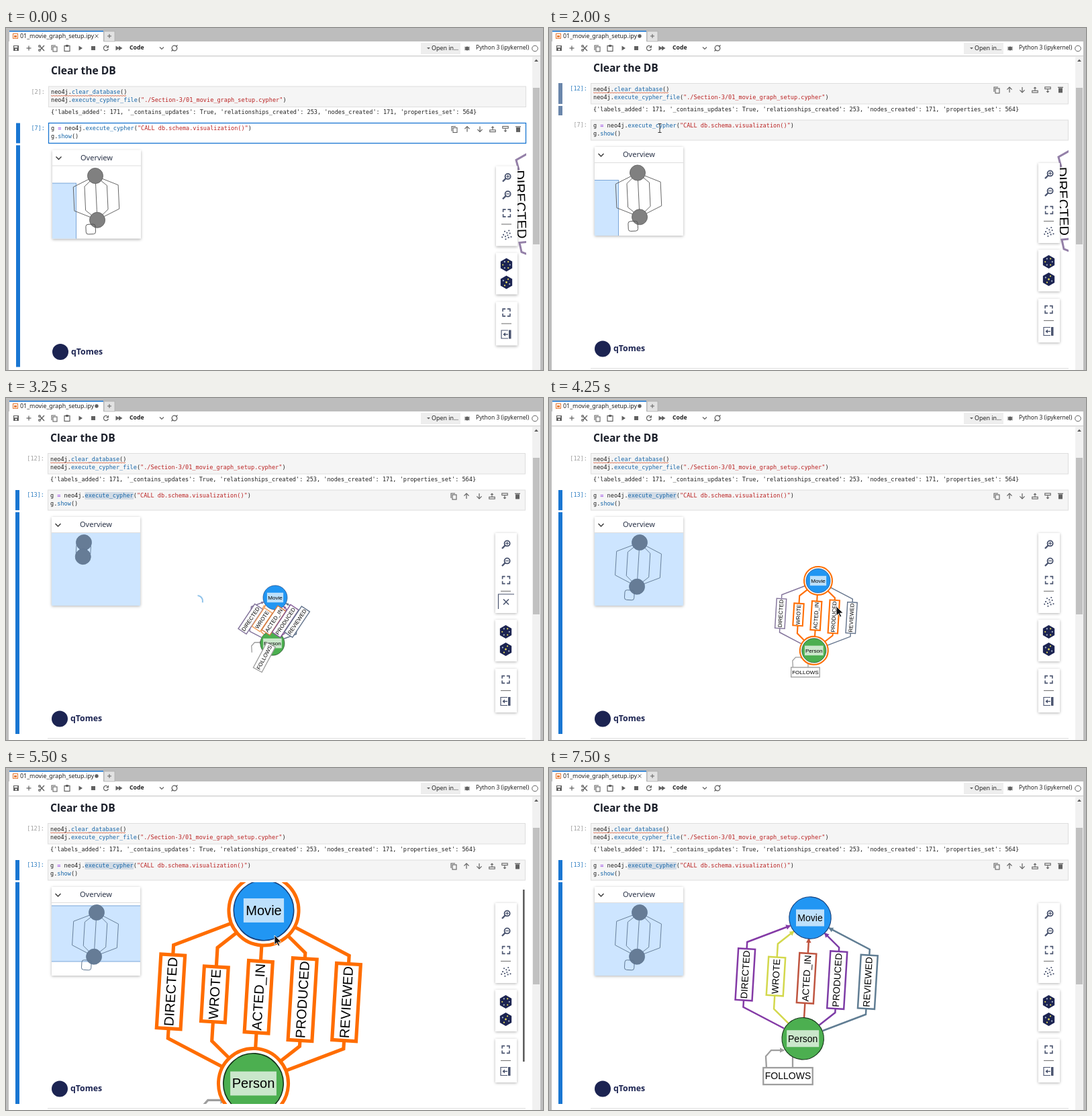
Animation, 800 px wide and 509 px high, one loop 7.75 s. Source, as an HTML page with a canvas:

```html
<!DOCTYPE html>
<html lang="en">
<head>
<meta charset="utf-8">
<title>Notebook graph</title>
<style>
  html, body { margin: 0; width: 100%; height: 100%; overflow: hidden; background: #fff; }
  canvas { display: block; width: 800px; height: 509px; }
</style>
</head>
<body>
<canvas id="stage" width="800" height="509"></canvas>
<script>
const ctx = document.getElementById('stage').getContext('2d');
const LOOP = 7750, STEP = 250, TAU = Math.PI * 2;
const MONO = '"DejaVu Sans Mono", monospace', UI = '"Noto Sans", sans-serif', ARIAL = '"Liberation Sans", sans-serif';
const BLUE = '#1976d2', ICON = '#616161', ORANGE = '#ff6d00', NAVY = '#1c2452', SLATE = '#4b5570';
const TILT = 0.06;

const clamp01 = v => Math.max(0, Math.min(1, v));
const mix = (a, b, u) => a + (b - a) * u;
const between = (k, a, b) => k >= a && k <= b;

function box(x, y, w, h, fill, stroke, lw = 1) {
  if (fill) { ctx.fillStyle = fill; ctx.fillRect(x, y, w, h); }
  if (stroke) { ctx.strokeStyle = stroke; ctx.lineWidth = lw; ctx.strokeRect(x, y, w, h); }
}
function path(pts, color, lw = 1, fill) {
  ctx.beginPath();
  pts.forEach(([x, y], i) => i ? ctx.lineTo(x, y) : ctx.moveTo(x, y));
  if (fill) { ctx.closePath(); ctx.fillStyle = fill; ctx.fill(); }
  if (color) { ctx.strokeStyle = color; ctx.lineWidth = lw; ctx.stroke(); }
}
function disc(x, y, r, fill, stroke, lw = 1) {
  ctx.beginPath();
  ctx.arc(x, y, r, 0, TAU);
  if (fill) { ctx.fillStyle = fill; ctx.fill(); }
  if (stroke) { ctx.strokeStyle = stroke; ctx.lineWidth = lw; ctx.stroke(); }
}
function text(s, x, y, font, color = '#212121', align = 'left') {
  ctx.font = font;
  ctx.fillStyle = color;
  ctx.textAlign = align;
  ctx.textBaseline = 'middle';
  ctx.fillText(s, x, y);
}
function at(x, y, draw, angle = 0, scale = 1) {
  ctx.save();
  ctx.translate(x, y);
  ctx.rotate(angle);
  ctx.scale(scale, scale);
  draw();
  ctx.restore();
}
function clipped(x, y, w, h, draw) {
  ctx.save();
  ctx.beginPath();
  ctx.rect(x, y, w, h);
  ctx.clip();
  draw();
  ctx.restore();
}
function code(parts, x, y) {
  for (const [s, color] of parts) {
    text(s, x, y, '8.57px ' + MONO, color);
    x += ctx.measureText(s).width;
  }
}

// Graph, in units where the two nodes are 180 apart
const RELATIONS = [
  ['DIRECTED', -2, '#843aa6'], ['WROTE', -1, '#d3d84c'], ['ACTED_IN', 0, '#bf5540'],
  ['PRODUCED', 1, '#7d3ca6'], ['REVIEWED', 2, '#607d93']
];
const MUTED = ['#82739a', '#f0a060', '#d07b45', '#855c98', '#64748c'];

function relationPath(i, gap, dist) {
  const x = i * gap, side = Math.sign(i), far = Math.abs(i) === 2;
  const ex = side * (far ? 29 : 23), ey = side ? (far ? 13.5 : 21.5) : 31;
  const bend = 41.5 * dist / 180;
  return [[ex, dist - ey], [x, dist - bend], [x, bend], [ex, ey]];
}
function arrowHead(from, to, color) {
  at(to[0], to[1], () => path([[1, 0], [-6, -3.8], [-6, 3.8]], null, 0, color),
    Math.atan2(to[1] - from[1], to[0] - from[0]));
}
function edgeLabel(s, x, y, angle, color, lw) {
  at(x, y, () => {
    ctx.font = '14px ' + ARIAL;
    const w = ctx.measureText(s).width + 5;
    box(-w / 2, -12.5, w, 25, '#fff', color, lw);
    text(s, 0, 1, '14px ' + ARIAL, '#000', 'center');
  }, angle);
}
function node(s, y, w, color, rim, ring) {
  if (ring) disc(0, y, 36.3, '#fff', ORANGE, 3.5);
  disc(0, y, 31.2, color, rim, 1.1);
  at(0, y, () => {
    box(-w / 2, -12.5, w, 25, 'rgba(255,255,255,.7)');
    text(s, 0, 1, '14px ' + ARIAL, '#000', 'center');
  }, -TILT);
}
function drawGraph({ x, y, s, spread, lit, muted }) {
  const dist = mix(118, 180, spread), gap = mix(30, 45.7, spread);
  const styles = RELATIONS.map(([, i, color], n) =>
    lit.includes(i) ? [ORANGE, 3.6] : [muted ? MUTED[n] : color, 2.5]);
  const loop = { x: mix(-28, -33, spread), y: mix(154, 235.5, spread) };
  const gray = '#9e9e9e';
  at(x, y, () => {
    const top = loop.y - 12.5;
    const hook = [[loop.x - 32, top], [loop.x - 33, top - 17], [loop.x - 25, top - 26], [loop.x - 6, top - 26]];
    path(hook, gray, 2.3);
    path([[loop.x + 7, top], [loop.x + 7, top - 16]], gray, 2.3);
    arrowHead(hook[2], hook[3], gray);
    ctx.rotate(TILT);
    RELATIONS.forEach(([, i], n) => {
      const pts = relationPath(i, gap, dist), [color, lw] = styles[n];
      path(pts, color, lw);
      if (!lit.includes(i)) arrowHead(pts[2], pts[3], color);
    });
    node('Movie', 0, 42, '#2196f3', '#17407c', lit.length);
    node('Person', dist, 48, '#4caf50', '#16361a', lit.length);
    RELATIONS.forEach(([name, i], n) =>
      edgeLabel(name, i * gap, dist / 2, -Math.PI / 2 + (1 - spread) * 0.53, ...styles[n]));
    ctx.rotate(-TILT);
    edgeLabel('FOLLOWS', loop.x, loop.y, (spread - 1) * 1.08, gray, 2.3);
  }, 0, s);
}

// Camera and layout state for each step
function graphPose(k) {
  const spread = clamp01((k - 13) / 3);
  const zoomIn = clamp01((k - 17) / 5), zoomOut = clamp01((k - 22) / 3);
  const pose = { x: 401, y: mix(297, 272, spread), s: 0.578, spread };
  if (k > 17) {
    pose.s = 0.578 * Math.pow(2.48, zoomIn) * Math.pow(1 / 1.433, zoomOut);
    const u = (pose.s - 0.578) / (1.433 - 0.578);
    pose.x = k > 22 ? mix(384, 389, zoomOut) : mix(401, 384, u);
    pose.y = k > 22 ? mix(212, 223, zoomOut) : mix(272, 212, u);
  }
  pose.lit = k === 17 ? [-1, 0, 1] : between(k, 18, 23) ? [-2, -1, 0, 1, 2] : [];
  pose.muted = k < 18;
  return pose;
}

// Icons, centred on the origin
const corners = (r, color) => {
  for (let q = 0; q < 4; q++) at(0, 0, () => path([[-r, -r + 4], [-r, -r], [-r + 4, -r]], color, 1.6), q * TAU / 4);
};
const arrow = (angle, len = 4) => at(0, 0, () => {
  path([[0, len], [0, -len]], ICON, 1.2);
  path([[-3.6, -len + 3.6], [0, -len], [3.6, -len + 3.6]], ICON, 1.2);
}, angle);
function magnifier(plus) {
  path([[-6, 6], [-1, 1]], SLATE, 2.4);
  disc(1.6, -1.6, 4, '#fff', SLATE, 1.9);
  path([[-.7, -1.6], [3.9, -1.6]], SLATE, 1.2);
  if (plus) path([[1.6, -3.9], [1.6, .7]], SLATE, 1.2);
}
function hexButton(flat) {
  const ring = (r, n, turn) => Array.from({ length: n }, (_, i) =>
    [r * Math.cos(i * TAU / n + turn), r * Math.sin(i * TAU / n + turn)]);
  path(ring(10, 6, Math.PI / 6), null, 0, NAVY);
  ring(5.3, flat ? 4 : 6, flat ? .5 : 0).forEach(([x, y], i) => disc(x, y, 1.1, i % 2 ? '#e3d95a' : '#aebfd0'));
  if (flat) disc(0, 0, 1.4, '#e3d95a');
}
const scatter = () => {
  for (let i = 0; i < 11; i++) {
    const a = i * 2.4, r = 2.4 * Math.sqrt(i + .3);
    disc(r * Math.cos(a), r * Math.sin(a), 1.1, SLATE);
  }
};
function trash() {
  box(-3, -2.6, 6, 7, ICON);
  box(-4, -4.3, 8, 1.2, ICON);
}
function insert(up) {
  at(0, 0, () => {
    box(-4.2, 1.3, 8.4, 2.8, null, ICON, 1.1);
    path([[0, 1], [0, -3]], ICON, 1.1);
    path([[-2.5, -2], [0, -4.5], [2.5, -2]], null, 0, ICON);
  }, up ? 0 : Math.PI);
}
function copies() {
  path([[-4, 3], [-4, -4], [2, -4]], ICON, 1.1);
  box(-2, -2, 6, 7, null, ICON, 1.1);
}
function scissors() {
  path([[-3.5, -4], [4, 4]], ICON, 1.3);
  path([[-3.5, 4], [4, -4]], ICON, 1.3);
  disc(-3, -3, 1.4, '#fff', ICON, 1.2);
  disc(-3, 3, 1.4, '#fff', ICON, 1.2);
}
function refresh() {
  ctx.beginPath();
  ctx.arc(0, 0, 3.5, .3, 5.2);
  ctx.strokeStyle = ICON;
  ctx.lineWidth = 1.3;
  ctx.stroke();
  path([[4, -4.5], [4, -.5], [0, -.5]], null, 0, ICON);
}
const triangle = x => path([[x - 2.5, -3.5], [x + 3, 0], [x - 2.5, 3.5]], null, 0, ICON);
const chevron = () => path([[-3, -1.5], [0, 1.5], [3, -1.5]], ICON, 1.2);

function drawChrome(dirty) {
  box(0, 0, 800, 509, '#bdbdbd');
  box(4, 20, 792, 489, '#fff');
  box(5, 4, 140, 17, '#fff');
  box(5, 4, 140, 1.6, BLUE);
  box(146, 5, 16, 15, '#e2e2e2', '#a8a8a8', .7);
  at(154, 12, () => { path([[-3, 0], [3, 0]], ICON); path([[0, -3], [0, 3]], ICON); });
  box(10.5, 8.5, 7, 7, '#fff', '#e8803c', 1.1);
  box(12, 11, 4, 3, '#e8803c');
  clipped(21, 5, 110, 15, () => text('01_movie_graph_setup.ipynb', 21, 12, '8.9px ' + UI));
  if (dirty) disc(135, 12, 2.7, ICON);
  else at(135, 12, () => { path([[-2.5, -2.5], [2.5, 2.5]], ICON); path([[-2.5, 2.5], [2.5, -2.5]], ICON); });

  box(4, 41, 792, 1, '#cfcfcf');
  box(4, 42, 792, 1, '#eeeeee');
  at(15, 30, () => { box(-4, -4, 8, 8, ICON); box(-2.8, -3, 5, 2.2, '#fff'); disc(0, 2, 1.3, '#fff'); });
  at(34, 30, () => { path([[-3.5, 0], [3.5, 0]], ICON, 1.2); path([[0, -3.5], [0, 3.5]], ICON, 1.2); });
  at(53, 30, scissors);
  at(72, 30, copies);
  at(91, 30, () => { box(-4, -3.5, 8, 8, null, ICON, 1.2); box(-2, -5, 4, 3, ICON); });
  at(111, 30, () => triangle(0));
  box(127, 27, 6, 6, ICON);
  at(149, 30, refresh);
  at(168, 30, () => { triangle(-2); triangle(2.5); });
  text('Code', 184, 30, '600 8.7px ' + UI);
  at(232, 30, chevron);
  disc(251, 30, 3.8, null, ICON, 1.3);
  path([[246.5, 34.5], [249, 32]], ICON, 1.3);
  path([[253, 28], [255.5, 25.5]], ICON, 1.3);
  box(618, 22, 59, 17, '#eeeeee');
  path([[627, 29], [632, 29], [629.5, 31.5]], null, 0, ICON);
  text('Open in...', 634, 30, '8.9px ' + UI);
  disc(687, 30.5, 2.9, ICON);
  for (const d of [-2, 0, 2]) path([[683, 30.5 + d], [691, 30.5 + d]], ICON, .8);
  text('Python 3 (ipykernel)', 700, 30, '8.5px ' + UI);
  disc(788, 30.5, 4.3, null, ICON, 1);

  box(784, 43, 12, 466, '#f1f1f1');
  path([[787, 50], [793, 50], [790, 46.5]], null, 0, '#606060');
  box(785, 89, 10, 233, '#c1c1c1');
}

function cellTools(y) {
  [copies, () => arrow(0), () => arrow(Math.PI), () => insert(true), () => insert(false), trash]
    .forEach((icon, i) => at(667 + 19 * i, y, icon));
}
function drawCells(k) {
  const early = k < 4, active = between(k, 3, 8) ? 1 : 2;
  const first = k < 4 ? '[2]:' : k < 7 ? '[*]:' : '[12]:';
  const second = k < 10 ? '[7]:' : k < 12 ? '[*]:' : '[13]:';
  const bar = active === 1 && k > 6 ? '#6a86ab' : BLUE;
  const ink = '#212121', fn = '#1565a8', str = '#ba2121';
  const prompt = (s, y, on) => text(s, 57, y, '8.57px ' + MONO, on ? '#307fc1' : '#9e9e9e', 'right');

  text('Clear the DB', 66, 60.5, '600 15.6px ' + UI, '#1b1f2a');
  box(62.5, 82.5, 711, 30.5, '#f5f5f5', '#dedede');
  box(62.5, 137, 711, 30, early && active === 2 ? '#fff' : '#f5f5f5',
    early && active === 2 ? BLUE : '#dedede', early && active === 2 ? 1.3 : 1);
  if (active === 1) {
    box(14, 82, 6, 31, bar);
    box(14, 116, 6, 14, bar);
  } else {
    box(14, 137, 6, 30, BLUE);
    box(14, 170, 6, 330, BLUE);
  }
  prompt(first, 91, active === 1);
  prompt(second, 145, active === 2);
  cellTools(active === 1 ? 92 : 146);

  code([['neo4j.', ink], ['clear_database', fn], ['()', ink]], 66, 91.5);
  path(Array.from({ length: 57 }, (_, i) => [66 + i * 2, 96 + i % 2 * .8]), '#d9694a', .9);
  code([['neo4j.', ink], ['execute_cypher_file', fn], ['(', ink],
    ['"./Section-3/01_movie_graph_setup.cypher"', str], [')', ink]], 66, 103.5);
  code([["{'labels_added': 171, '_contains_updates': True, 'relationships_created': 253, 'nodes_created': 171, 'properties_set': 564}", ink]], 66, 121.5);
  if (k > 9) box(117.5, 140, 72.5, 11, '#d3dce6');
  code([['g ', ink], ['=', '#8b2be2'], [' neo4j.', ink], ['execute_cypher', fn], ['(', ink],
    ['"CALL db.schema.visualization()"', str], [')', ink]], 66, 145.5);
  code([['g.', ink], ['show', fn], ['()', ink]], 66, 157.5);
  if (!early) path([[62, 506.5], [774, 506.5]], '#dedede');
}

function card(x, y, w, h) {
  ctx.save();
  ctx.shadowColor = 'rgba(0,0,0,.3)';
  ctx.shadowBlur = 4;
  ctx.shadowOffsetY = 1;
  box(x, y, w, h, '#fff');
  ctx.restore();
}
function miniGraph(x, y, tilt, dist, fill, line) {
  at(x, y, () => {
    for (const [, i] of RELATIONS) path(relationPath(i, 45.7 * dist / 180, dist), line, 2.4);
    disc(0, 0, 31.5, fill, line, 2);
    disc(0, dist, 31.5, fill, line, 2);
    if (dist > 150) {
      ctx.beginPath();
      ctx.roundRect(-48, 196, 39, 40, 9);
      ctx.strokeStyle = line;
      ctx.lineWidth = 2.6;
      ctx.stroke();
    }
  }, tilt, .366);
}
function drawOverview(k, pose) {
  card(68, 177, 132, 132);
  at(77.5, 189, () => path([[-4, -2], [0, 2], [4, -2]], '#333', 1.3));
  text('Overview', 134, 189, '11px ' + UI, '#2a3348', 'center');
  path([[68, 200.5], [200, 200.5]], '#dddddd');
  clipped(68, 201, 132, 108, () => {
    if (k < 11) {
      box(67, 226.5, 36.5, 84, '#cde5ff', '#7ba6d8');
      miniGraph(132, 215.5, -.046, 180, '#808080', '#555');
      return;
    }
    if (k < 12) return;
    const zoomed = clamp01((pose.s - 1) / .433);
    const top = mix(200, 205, zoomed), bottom = mix(310, 288, zoomed);
    box(67, top, 134, bottom - top, '#cde5ff', '#7ba6d8');
    miniGraph(mix(116, 135, pose.spread), 215, TILT, mix(58, 180, pose.spread), '#667c96', '#5d7590');
  });
}
function drawSidebar(k) {
  card(729, 201, 32, 119);
  card(729, 330, 32, 62);
  card(729, 403, 32, 65);
  at(745, 218, () => magnifier(true));
  at(745, 244, () => magnifier(false));
  at(745, 271, () => corners(5.4, SLATE));
  path([[737, 287.5], [752, 287.5]], '#777', 1.1);
  if (between(k, 12, 14)) {
    path([[733.5, 314], [733.5, 292], [757, 292]], SLATE, 1.2);
    at(745, 303.5, () => { path([[-4, -4], [4, 4]], SLATE, 1.6); path([[-4, 4], [4, -4]], SLATE, 1.6); });
  } else at(745, 304, scatter);
  at(744.5, 348, () => hexButton(false));
  at(744.5, 374, () => hexButton(true));
  at(744.5, 419, () => corners(5.4, SLATE));
  path([[737, 435.5], [752, 435.5]], '#777', 1.1);
  at(744, 451.5, () => {
    path([[3, -6], [-7, -6], [-7, 6], [3, 6]], SLATE, 1.2);
    path([[3, 0], [-4, 0]], SLATE, 1.4);
    path([[-1, -3], [-4.5, 0], [-1, 3]], null, 0, SLATE);
    box(4, -6.5, 3.5, 13, SLATE);
  });
}
function drawCloseUp() {
  const violet = '#9480a8';
  path([[775, 183], [759, 192], [763, 207]], violet, 3);
  path([[775, 314], [764, 315], [767, 329], [775, 332]], violet, 3);
  at(764.5, 258, () => text('DIRECTED', 0, 0, '20px ' + ARIAL, '#000', 'center'), Math.PI / 2 - .04);
}
function drawOutput(k) {
  const pose = graphPose(k);
  clipped(20, 170, 754, 330, () => {
    if (k < 11) drawCloseUp();
    else if (k > 11) drawGraph(pose);
    if (between(k, 12, 14)) {
      ctx.beginPath();
      ctx.arc(285, 302, 8, -1.5 + (k - 13) * 1.6, .3 + (k - 13) * 1.6);
      ctx.strokeStyle = '#90c3ea';
      ctx.lineWidth = 2;
      ctx.stroke();
    }
  });
  drawOverview(k, pose);
  drawSidebar(k);
  if (between(k, 20, 23)) box(770, 181, 2.6, 256, '#5e5e5e');
  disc(80, 477.5, 12, NAVY);
  text('qTomes', 96, 477.5, '600 12.3px ' + UI, NAVY);
}

function drawPointer(k) {
  if (between(k, 5, 9)) at(165, 149, () => {
    path([[0, -6], [0, 6]], '#333');
    path([[-2.5, -6.5], [2.5, -6.5]], '#333');
    path([[-2.5, 6.5], [2.5, 6.5]], '#333');
  });
  if (between(k, 16, 23)) {
    const u = clamp01((k - 17) / 5);
    at(mix(428, 400, u), mix(310, 249, u), () =>
      path([[0, 0], [0, 14], [3.3, 11], [5.6, 16], [7.8, 15], [5.5, 10.2], [10, 10], [0, 0]], '#fff', .8, '#111'));
  }
}

function render(now) {
  const k = Math.floor(now % LOOP / STEP);
  drawChrome(between(k, 4, 27));
  clipped(5, 43, 779, 466, () => {
    if (k < 4) ctx.translate(1, 4.5);
    drawCells(k);
    drawOutput(k);
    drawPointer(k);
  });
  requestAnimationFrame(render);
}
requestAnimationFrame(render);
</script>
</body>
</html>
```
